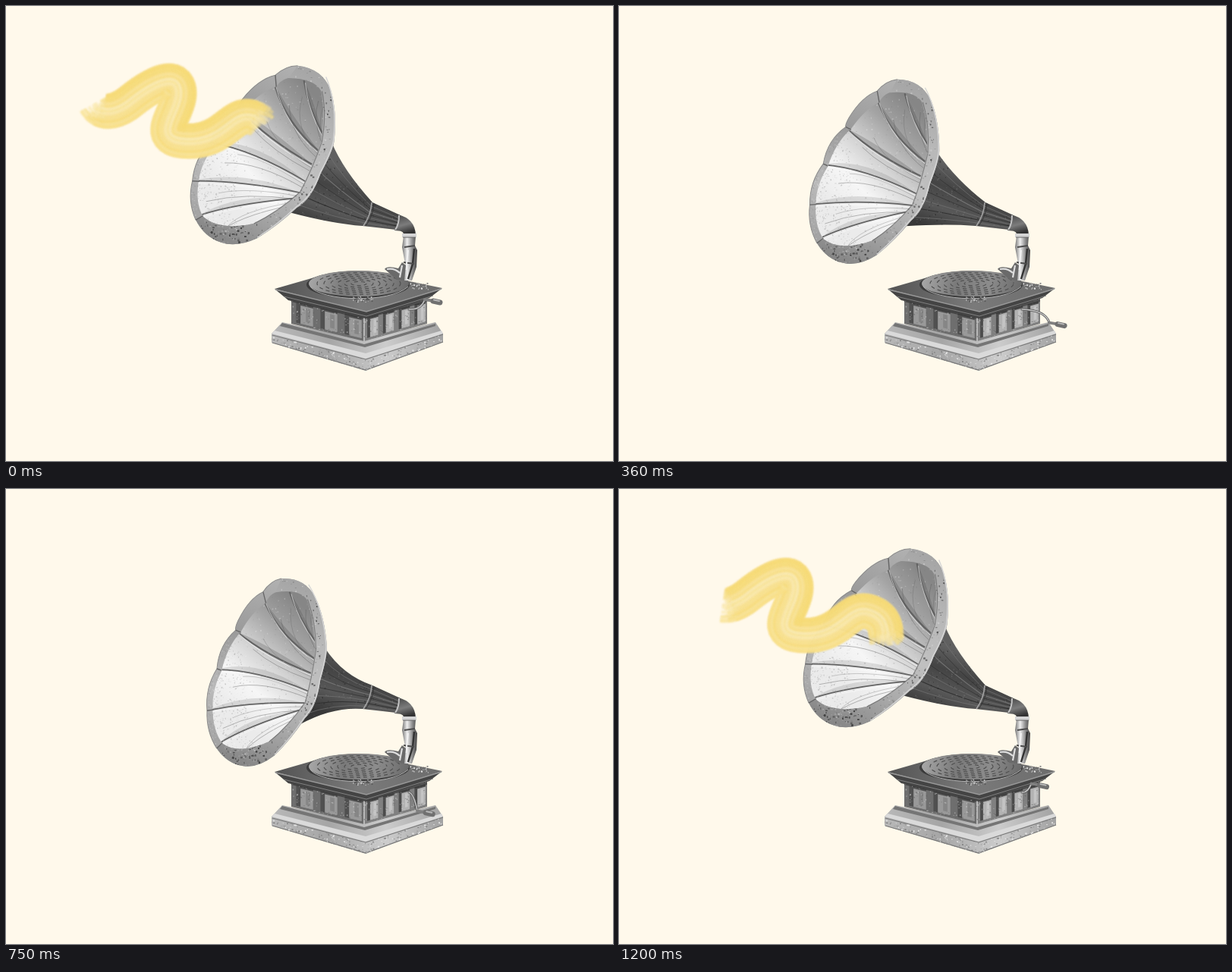
Recreate the animation shown at these times as an HTML page with a canvas. Size 800 px wide and 600 px high, loop 1290 ms.

```html
<!DOCTYPE html>
<html lang="en">
<head>
<meta charset="utf-8">
<title>Gramophone</title>
<style>
html, body { margin: 0; width: 100%; height: 100%; overflow: hidden; background: #fff9eb; }
canvas { display: block; }
</style>
</head>
<body>
<canvas width="800" height="600"></canvas>
<script>
const ctx = document.querySelector('canvas').getContext('2d');
const LOOP = 1290, TAU = Math.PI * 2;
const TICKS = [0, 60, 150, 210, 300, 360, 450, 510, 600, 660, 750, 810, 900, 960, 1050, 1140, 1200];
const STEPS = TICKS.length;

// step, bell centre x, y, tilt in degrees
const BELL = [[0, 339, 196.5, 3], [3, 337, 207, 0], [5, 336, 218.5, -3], [7, 334, 231, -6],
  [9, 339, 240, -7.3], [10, 342.5, 242, -7.5], [14, 347.5, 215, -1.5], [16, 339, 196.5, 3], [17, 339, 196.5, 3]];
// step, ribbon head, ribbon tail (lengths along the wave), drift x, y
const RIBBON = [[12.5, 418, 420, 38, 72], [14, 325, 408, 24, 50], [16, 62, 402, 5, 15],
  [17, 44, 365, 0, 0], [20, 0, 106, -4, -34], [22, 0, 0, -5, -45]];

const wave = document.createElementNS('http://www.w3.org/2000/svg', 'path');
wave.setAttribute('d', 'M112 90C108 150 140 145 165 125S225 85 228 112S188 176 238 178S298 138 325 147S345 175 350 205');
const waveLength = wave.getTotalLength();

function track(keys, t) {
  const i = Math.max(1, keys.findIndex(key => key[0] >= t));
  const a = keys[i - 1], b = keys[i], u = (t - a[0]) / (b[0] - a[0]);
  return a.slice(1).map((v, j) => v + (b[j + 1] - v) * u);
}

// The bell turns away from the viewer as it drops, so it also narrows
function bellMatrix(step) {
  const [x, y, tilt] = track(BELL, step);
  return new DOMMatrix().translate(x, y).scale(1 + tilt * .009, 1).rotate(tilt).translate(-337, -207);
}

function random(seed) {
  return () => (seed = (seed * 16807) % 2147483647) / 2147483647;
}

function ramp(x0, y0, x1, y1, ...colors) {
  const g = ctx.createLinearGradient(x0, y0, x1, y1);
  colors.forEach((c, i) => g.addColorStop(i / (colors.length - 1), c));
  return g;
}

function fill(d, style) {
  ctx.fillStyle = style;
  ctx.fill(new Path2D(d));
}

function line(d, style, width = 1) {
  ctx.strokeStyle = style;
  ctx.lineWidth = width;
  ctx.stroke(new Path2D(d));
}

function ellipse(x, y, rx, ry) {
  ctx.beginPath();
  ctx.ellipse(x, y, rx, ry, 0, 0, TAU);
}

function clipped(d, draw) {
  ctx.save();
  ctx.clip(new Path2D(d));
  draw();
  ctx.restore();
}

function specks(count, x, y, w, h, seed, shades, size = 1.5) {
  const rnd = random(seed);
  for (let i = 0; i < count; i++) {
    ctx.fillStyle = shades[i % shades.length];
    ctx.fillRect(x + rnd() * w, y + rnd() * h, .5 + rnd() * size, .5 + rnd() * size);
  }
}

// One side of the cabinet: a skewed strip with recessed panels
function side(x0, y0, x1, y1, height, panels, shades) {
  const at = u => [x0 + (x1 - x0) * u, y0 + (y1 - y0) * u];
  const strip = (a, b, top, bottom, style) => {
    const [ax, ay] = at(a), [bx, by] = at(b);
    fill(`M${ax} ${ay + top}L${bx} ${by + top}V${by + bottom}L${ax} ${ay + bottom}Z`, style);
  };
  strip(0, 1, 0, height, shades[0]);
  for (let i = 0; i < panels; i++) {
    const a = (i + .2) / panels, b = (i + .9) / panels;
    strip(a, b, 3, height - 3, shades[1]);
    strip(a + .18 / panels, b, 6, height - 3, shades[2]);
    strip(a + .4 / panels, b - .12 / panels, 8, height - 7, shades[3]);
  }
  strip(0, 1, 0, 4, 'rgba(30,30,30,.5)');
}

function drawCabinet(step) {
  fill('M350 432L364 417L472 440L566 417L576 432V443L474 481L350 444Z', ramp(350, 0, 576, 0, '#b8b8b8', '#a6a6a6', '#cccccc', '#a2a2a2'));
  fill('M350 432L474 465L576 432L574 428L474 458L354 428Z', '#dadada');
  fill('M364 418L472 446L566 419V422L473 450L361 422Z', '#757575');
  line('M351 444L474 480L576 443', '#777', 1.3);
  line('M351 434L474 466L576 433', '#777', 1.2);
  clipped('M350 434L474 467L576 433V443L474 481L350 444Z', () => {
    specks(700, 350, 432, 226, 49, 11, ['#858585', '#e2e2e2', '#989898'], 2);
  });
  side(376, 386, 472, 409, 33, 3, ['#6e6e6e', '#505050', '#999999', '#868686']);
  side(472, 409, 555, 386, 33, 4, ['#808080', '#4b4b4b', '#b2b2b2', '#c4c4c4']);
  line('M472 409V442', '#b8b8b8', 2);
  clipped('M376 386L472 409L555 386V418L472 442L376 418Z', () => {
    specks(380, 376, 386, 180, 58, 23, ['#5c5c5c88', '#d0d0d088']);
  });

  fill('M354 373L475 401L575 372L558 385L474 412L372 388Z', '#444');
  fill('M354 373L420 354L465 349L575 372L475 403Z', ramp(360, 370, 575, 372, '#555555', '#7a7a7a', '#6c6c6c'));
  line('M355 374L475 403L574 373', '#989898', 1.4);
  line('M366 383L475 409L563 382', '#808080', 1);

  ctx.fillStyle = '#3c3c3c';
  ellipse(464, 367.5, 68, 18);
  ctx.fill();
  ctx.fillStyle = ramp(402, 355, 530, 378, '#a6a6a6', '#7a7a7a', '#8c8c8c', '#696969');
  ellipse(465, 366, 66, 17);
  ctx.fill();
  ctx.strokeStyle = '#505050';
  ctx.lineWidth = 1.2;
  ctx.setLineDash([5, 4]);
  for (let r = 10; r < 64; r += 9) {
    ctx.lineDashOffset = step * 5 + r;
    ellipse(465, 366, r, r * .26);
    ctx.stroke();
  }
  ctx.setLineDash([]);
  line('M401 370C415 389 505 393 530 370', '#b0b0b0', 1);
  specks(50, 457, 383, 26, 7, 5, ['#d0d0d0', '#555']);
  specks(60, 532, 365, 24, 8, 9, ['#e4e4e4', '#666']);
}

function drawCrank(step) {
  const turn = TAU * step / STEPS;
  const angle = turn - 1.52 + .24 * Math.sin(turn);
  const x = 573 + 19 * Math.cos(angle), y = 411 + 20 * Math.sin(angle);
  const hx = x - 22, hy = y - 4;
  const arm = `M531 400Q${hx - 5} 401 ${hx} ${hy}`;
  ctx.lineCap = 'round';
  line(arm, '#555', 3);
  line(arm, '#c4c4c4', 1.5);
  line(`M${hx} ${hy}L${x - 10} ${y - 2}`, '#808080', 4);
  line(`M${x - 11} ${y - 2}L${x - 2} ${y}`, '#707070', 7);
  line(`M${x - 10} ${y - 3.5}L${x - 3} ${y - 2}`, '#b8b8b8', 2);
  ctx.lineCap = 'butt';
}

function drawArm() {
  fill('M524 303H540L539 316L542 322L541 344L535 362H524L526 340L522 318Z', ramp(522, 0, 542, 0, '#777777', '#eeeeee', '#909090', '#404040'));
  line('M538 320L536 340L530 360', '#333', 2.5);
  line('M525 318L539 316M524 338L538 340', '#4c4c4c', 2);
  line('M530 322L527 348', '#f2f2f2', 2);
  fill('M499 347Q502 342 517 346L522 338L527 342L525 362L515 361L506 353Z', '#6a6a6a');
  line('M502 347Q512 345 519 352M522 342L519 358', '#dedede', 2.2);
  fill('M516 275Q539 280 540 302H524Q525 296 512 296Z', ramp(520, 278, 526, 300, '#555555', '#7c7c7c', '#333333'));
  fill('M522 300H541V305H522Z', '#d5d5d5');
  line('M523 305H540', '#666');
}

function drawCone(matrix) {
  const put = (x, y) => {
    const p = matrix.transformPoint({ x, y });
    return [p.x, p.y];
  };
  const top = put(424, 186), low = put(376, 281), mid = put(392, 240);
  const bend = top[1] + 36;
  const cone = `M${top}Q444 ${bend} 483 259L520 276L514 295L470 290Q430 287 ${low}L${mid}Z`;
  fill(cone, ramp(450, 215, 420, 295, '#606060', '#444444', '#585858', '#383838'));
  clipped(cone, () => {
    for (let i = 1; i < 8; i++) {
      const u = i / 8;
      const x = top[0] + (low[0] - top[0]) * u, y = top[1] + (low[1] - top[1]) * u;
      line(`M${x} ${y}Q${444 - 14 * u} ${bend + (288 - bend) * u} ${482 - 9 * u} ${260 + 30 * u}L517 ${277 + 18 * u}`,
        i % 2 ? '#747474' : '#303030', i % 3 ? .7 : 1.1);
    }
    specks(400, 370, 180, 150, 120, 31, ['#77777788', '#2a2a2a88']);
  });
  line('M482 259Q481 276 471 290', '#a5a5a5', 1.6);
  line('M485 260Q484 277 474 290', '#333', 1);
  line('M518 276Q518 288 513 295', '#c4c4c4', 2);
}

function drawBell(matrix) {
  const outline = 'M375 87Q359 88 347 101Q326 107 307 134Q301 143 302 146Q276 162 269 193Q249 216 248 246Q243 273 255 297Q267 319 289 325Q309 331 335 317Q361 299 384 274Q402 262 412 227Q426 197 427 184Q429 145 419 117Q407 89 375 87Z';
  const inside = 'M378 104Q358 100 349 116Q329 124 309 149Q287 166 275 197Q258 220 256 246Q253 274 264 292Q285 310 329 298Q360 281 386 254Q400 225 410 187Q416 150 407 119Q398 103 378 104Z';
  const lip = 'M375 87Q407 89 419 117Q429 145 427 184Q426 197 412 227Q402 262 384 274Q361 299 335 317Q309 331 289 325Q267 319 255 297L264 292Q285 310 329 298Q360 281 386 254Q400 225 410 187Q414 150 407 119Q398 103 364 104Z';
  ctx.save();
  const { a, b, c, d, e, f } = matrix;
  ctx.transform(a, b, c, d, e, f);

  fill(outline, ramp(370, 90, 270, 310, '#b0b0b0', '#9a9a9a', '#bababa', '#a0a0a0'));
  fill(inside, ramp(285, 255, 408, 135, '#ebebeb', '#f6f6f6', '#d2d2d2', '#a4a4a4', '#868686'));
  clipped(inside, () => {
    const folds = [[384, 106, 391, 140, 412, 176], [347, 114, 363, 163, 409, 199], [303, 148, 341, 186, 400, 216],
      [268, 194, 324, 201, 393, 239], [247, 246, 310, 242, 386, 254], [259, 291, 300, 274, 380, 262]];
    folds.forEach(([x, y, mx, my, ex, ey], i) => {
      const fold = `M${x} ${y}Q${mx} ${my} ${ex} ${ey}`;
      fill(`${fold}Q${mx + 4} ${my - 15} ${x} ${y}Z`, `rgba(70,70,70,${i < 3 ? .24 : .15})`);
      line(fold, '#636363', i < 3 ? 2.2 : 1.7);
      line(`M${x + 2} ${y + 3}Q${mx} ${my + 4} ${ex} ${ey + 3}`, 'rgba(255,255,255,.55)', 1);
      line(`M${x + 20} ${y + 26}Q${mx + 7} ${my + 15} ${ex - 2} ${ey + 9}`, 'rgba(90,90,90,.5)', .8);
      line(`M${x + 36} ${y + 14}Q${mx + 10} ${my + 8} ${ex} ${ey + 5}`, 'rgba(90,90,90,.4)', .7);
    });
    specks(500, 250, 100, 170, 210, 47, ['#77777744', '#ffffff44', '#99999955']);
  });
  fill(lip, ramp(400, 100, 285, 322, '#a6a6a6', '#b8b8b8', '#c0c0c0', '#a8a8a8', '#868686'));
  clipped(outline, () => {
    specks(900, 245, 85, 60, 245, 61, ['#88888855', '#d8d8d855']);
  });
  clipped(lip, () => {
    specks(650, 250, 85, 180, 245, 71, ['#77777799', '#d8d8d899', '#8c8c8c99'], 1.8);
    specks(65, 262, 298, 80, 26, 83, ['#444', '#606060'], 2.6);
    specks(35, 400, 112, 20, 90, 97, ['#555', '#707070'], 2);
    specks(24, 380, 225, 26, 45, 13, ['#666'], 2);
  });
  line('M408 119Q416 150 411 187Q400 225 387 253Q360 281 330 298', 'rgba(75,75,75,.5)', 1.2);
  line('M412 100Q429 135 426 184Q424 199 411 227Q402 259 383 273Q359 299 335 316', '#d6d6d6', 1.4);
  line('M375 87Q359 88 347 101Q326 107 307 134Q301 143 302 146Q276 162 269 193Q249 216 248 246Q243 273 255 297', '#8a8a8a', 1);
  line('M347 101L349 116M302 146L309 150M269 193L275 196M248 246H257M255 297L264 291', '#666', 1.4);
  ctx.restore();
}

function drawRibbon(step) {
  const t = step < 6 ? step + STEPS : step;
  if (t <= 12.5 || t >= 22) return;
  const [head, tail, dx, dy] = track(RIBBON, t);
  const points = [];
  for (let s = 0; s <= waveLength; s += 3) {
    const p = wave.getPointAtLength(s);
    const a = wave.getPointAtLength(Math.max(0, s - 1)), b = wave.getPointAtLength(s + 1);
    const d = Math.hypot(b.x - a.x, b.y - a.y) || 1;
    points.push({ s, x: p.x + dx, y: p.y + dy, nx: (a.y - b.y) / d, ny: (b.x - a.x) / d });
  }
  const rnd = random(29);
  ctx.save();
  ctx.filter = 'blur(1.2px)';
  ctx.lineWidth = 4;
  ctx.lineJoin = 'round';
  for (let layer = 0; layer < 3; layer++) {
    for (let o = -21; o <= 21; o += 2) {
      const from = head + layer * 6 + rnd() * 7 - 8, to = tail - layer * 6 - rnd() * 7 + 8;
      const light = 81 - Math.abs(o) * .3 + (rnd() - .5) * 13;
      ctx.strokeStyle = `hsla(47,88%,${light}%,.55)`;
      ctx.beginPath();
      for (const p of points) {
        if (p.s >= from && p.s <= to) ctx.lineTo(p.x + p.nx * o, p.y + p.ny * o);
      }
      ctx.stroke();
    }
  }
  ctx.restore();
}

let shown = -1;
function frame(now) {
  const t = now % LOOP;
  const step = TICKS.filter(tick => tick <= t).length - 1;
  if (step !== shown) {
    shown = step;
    const matrix = bellMatrix(step);
    ctx.fillStyle = '#fff9eb';
    ctx.fillRect(0, 0, 800, 600);
    drawCabinet(step);
    drawCrank(step);
    drawArm();
    drawCone(matrix);
    drawBell(matrix);
    drawRibbon(step);
  }
  requestAnimationFrame(frame);
}
frame(0);
</script>
</body>
</html>
```
